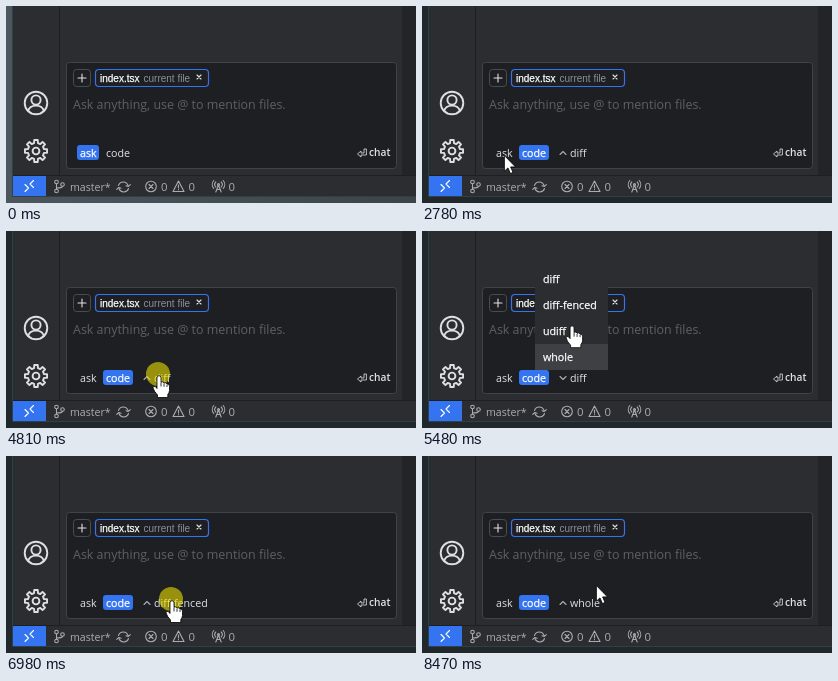
Animation of 410 by 197 pixels, one loop 8.54 s. Source, as an HTML page:

```html
<!DOCTYPE html>
<html lang="en">
<head>
<meta charset="utf-8">
<title>Chat mode switcher</title>
<style>
  html, body { margin: 0; width: 100%; height: 100%; overflow: hidden; background: #20282c; }
  svg { display: block; width: 100%; height: 100%; }
  text { font: 10.7px "Open Sans", "Noto Sans", sans-serif; fill: #dfe1e5; white-space: pre; }
  .chip { font: 10px "Liberation Sans", Arial, sans-serif; }
  .hint { font-size: 12.46px; fill: #5d6066; }
  .strong { stroke: #fff; stroke-width: .25; fill: #fff; }
  .status text { fill: #a8adb5; font-size: 11.4px; }
  .status .branch { font-size: 10.6px; }
  .line { fill: none; stroke: #a8adb5; stroke-width: 1.1; stroke-linecap: round; stroke-linejoin: round; }
  .bar { stroke: #dcdfe4; stroke-width: 1.9; }
  .light { stroke: #dfe1e5; }
</style>
</head>
<body>
<svg viewBox="0 0 410 197" preserveAspectRatio="none">
  <defs>
    <linearGradient id="sky" x1="0" y1="0" x2="1" y2="0">
      <stop offset="0" stop-color="#4b575d"/>
      <stop offset="1" stop-color="#3b4549"/>
    </linearGradient>
  </defs>
  <rect width="410" height="197" fill="#20282c"/>
  <rect id="desk" width="410" height="197" fill="url(#sky)"/>

  <path d="M7 0H410V190H7Z" fill="#2b2d30"/>
  <path d="M6.5 0V190.500H410" fill="none" stroke="#2f4049"/>
  <rect x="396" width="14" height="169" fill="#222427"/>
  <path d="M53.5 0V169.5M7 169.5H410" stroke="#1e1f22" fill="none"/>

  <!-- activity bar -->
  <g class="line bar">
    <circle cx="30" cy="97" r="11.3"/>
    <circle cx="30" cy="94" r="4.6"/>
    <path d="M22.2 105Q23.4 99.6 30 99.6T37.8 105"/>
    <path id="gear"/>
    <circle cx="30" cy="145" r="3.4"/>
  </g>

  <!-- prompt panel -->
  <rect x="60.5" y="56.5" width="330" height="106" rx="3" fill="#1e1f22" stroke="#414347"/>
  <rect x="67.5" y="63.5" width="17" height="17" rx="3" fill="#1e1f22" stroke="#4a4c51"/>
  <path class="line light" d="M72 72H80M76 68V76"/>
  <rect x="89.5" y="63.5" width="113" height="17" rx="3.5" fill="#1e1f22" stroke="#3574f0" stroke-width="1.2"/>
  <text class="chip strong" x="94" y="75.5">index.tsx</text>
  <text class="chip" x="137.5" y="75.5" style="fill:#8c9097">current file</text>
  <path class="line light" d="M191 69L195 73M195 69L191 73"/>
  <text class="hint" x="67" y="102.5">Ask anything, use @ to mention files.</text>
  <rect id="pill" y="139" height="15" rx="3" fill="#3574f0"/>
  <text id="ask" x="74" y="150.5">ask</text>
  <text id="code" x="100" y="150.5">code</text>
  <g id="format">
    <path id="chevron" class="line"/>
    <text id="label" x="148" y="150.5"></text>
  </g>
  <path class="line light" stroke-width=".7" style="stroke-width:.8" d="M360 143H358V147H355V145L351.5 148 355 151V149H360Z"/>
  <text x="363" y="150" style="font-weight:600;font-size:10.2px">chat</text>

  <!-- status bar -->
  <g class="status">
    <rect x="7" y="170" width="33" height="20" fill="#3574f0"/>
    <path class="line" d="M19 178.5L22.5 182 19 185.5M27.5 174.5L24 178 27.5 181.5" style="stroke:#fff"/>
    <g class="line">
      <circle cx="50.5" cy="176" r="1.8"/>
      <circle cx="50.5" cy="185" r="1.8"/>
      <circle cx="56.5" cy="178.5" r="1.8"/>
      <path d="M50.5 178V183M56.5 180.5Q56 182 50.5 182"/>
      <path d="M112.5 179.5A5 5 0 0 1 122 179.5M122.5 182.5A5 5 0 0 1 113 182.5"/>
      <path d="M120 179.7L122.2 180.5 124.3 178.7M115 182.3L112.8 181.5 110.7 183.3"/>
      <circle cx="145" cy="180.5" r="5.3"/>
      <path d="M143 178.5L147 182.5M147 178.5L143 182.5"/>
      <path d="M172.5 175L178 185.5H167ZM172.5 179V182M172.5 183.5V183.7"/>
      <path d="M212.5 179L209.8 186M212.5 179L215.2 186M210.8 183.5H214.2"/>
      <circle cx="212.5" cy="178.5" r="1"/>
      <path d="M209.8 181A3.6 3.6 0 0 1 209.8 176M215.2 181A3.6 3.6 0 0 0 215.2 176M207.8 182.5A6 6 0 0 1 207.8 174.5M217.2 182.5A6 6 0 0 0 217.2 174.5"/>
    </g>
    <text class="branch" x="64" y="184.5">master*</text>
    <text x="155" y="185">0</text>
    <text x="182.5" y="185">0</text>
    <text x="222.5" y="185">0</text>
  </g>

  <g id="menu">
    <rect y="35" width="73" height="104" rx="2" fill="#2b2d30"/>
    <rect y="113" width="73" height="26" fill="#3e4044"/>
  </g>

  <circle id="click" r="12" fill="#f0e400" opacity=".58"/>
  <g id="cursor" stroke="#000" fill="#fff" stroke-linejoin="round">
    <path id="arrow" stroke-width=".8" d="M.4 .6V16.2L4 12.9 6.4 18.5 9 17.4 6.6 11.9H11.5Z"/>
    <g id="hand" stroke-width=".8" transform="translate(1 1)">
      <path d="M-2 2Q0 -1 2 2V7.2Q4.300 6 5 8Q7.3 7 8 9Q10.5 8.6 10.5 11.2V15.5Q10.3 17.5 8.8 19.5V22.5H-1.5V20Q-5 16.5 -6 12.8Q-5.6 10.3 -3.6 11.6L-2 13.5Z"/>
      <path d="M2 7.5V11.5M5 8.5V11.8M8 9.5V12" fill="none"/>
    </g>
  </g>
</svg>
<script>
const LOOP = 8540;
const OPTIONS = ['diff', 'diff-fenced', 'udiff', 'whole'];
const $ = id => document.getElementById(id);
const show = (el, on) => el.setAttribute('visibility', on ? 'inherit' : 'hidden');
const set = (el, attrs) => { for (const k in attrs) el.setAttribute(k, attrs[k]); };
const within = (t, spans) => spans.some(([a, b]) => t >= a && t < b);

// Pointer moves: start, end, target x, target y
const MOVES = [
  [70, 550, 99, 153], [950, 1500, 115, 147], [2440, 2780, 82, 149],
  [3520, 3720, 114, 149], [4200, 4540, 152, 143], [5210, 5620, 148, 75],
  [6290, 6710, 165, 143], [7250, 7670, 163, 132], [7800, 7930, 161, 130],
  [8270, 8470, 174, 129]
];
const CLICKS = [[1880, 1950], [3050, 3180], [3920, 4060], [4810, 4940], [5950, 6080], [6980, 7050], [7800, 7930]];
const CODE = [[1950, 3180], [4060, LOOP]];
const OPEN = [[4940, 6080], [7050, 7930]];

OPTIONS.forEach((name, i) => {
  const el = document.createElementNS('http://www.w3.org/2000/svg', 'text');
  set(el, { class: 'strong', x: 8, y: 52 + 26 * i });
  el.textContent = name;
  $('menu').appendChild(el);
});

function gearPath(cx, cy, teeth) {
  const step = Math.PI * 2 / teeth, pts = [];
  for (let i = 0; i < teeth; i++)
    for (const [r, f] of [[8.2, -.3], [11.2, -.2], [11.2, .2], [8.2, .3]]) {
      const a = (i + f) * step;
      pts.push((cx + r * Math.cos(a)).toFixed(2) + ' ' + (cy + r * Math.sin(a)).toFixed(2));
    }
  return 'M' + pts.join('L') + 'Z';
}
$('gear').setAttribute('d', gearPath(30, 145, 8));

function pointer(t) {
  let x = 128, y = 202;
  for (const [a, b, tx, ty] of MOVES) {
    if (t < a) break;
    const p = Math.min(1, (t - a) / (b - a)), e = p * p * (3 - 2 * p);
    x += (tx - x) * e;
    y += (ty - y) * e;
  }
  return [x, y];
}

function draw(t) {
  const code = within(t, CODE), open = within(t, OPEN);
  const format = t < 6080 ? 'diff' : t < 7930 ? 'diff-fenced' : 'whole';
  const menuX = t < 6080 ? 113 : 131;
  const [x, y] = pointer(t);
  const inBox = (l, top, r, bottom) => x >= l && x <= r && y >= top && y <= bottom;

  show($('desk'), t < 70);
  set($('pill'), code ? { x: 97, width: 30 } : { x: 71, width: 22 });
  set($('ask'), { class: code ? '' : 'strong' });
  set($('code'), { class: code ? 'strong' : '' });
  show($('format'), code);
  $('label').textContent = format;
  $('chevron').setAttribute('d', open ? 'M138 145.5L141 148.5 144 145.5' : 'M138 148.5L141 145.5 144 148.5');

  show($('menu'), open);
  $('menu').setAttribute('transform', `translate(${menuX} 0)`);

  const overMenu = open && inBox(menuX, 35, menuX + 73, 139);
  const overFormat = code && inBox(135, 138, format === 'diff-fenced' ? 202 : 178, 156);
  const hand = overMenu || overFormat || inBox(89, 63, 203, 81);
  show($('cursor'), t >= 70);
  show($('hand'), hand);
  show($('arrow'), !hand);
  $('cursor').setAttribute('transform', `translate(${x.toFixed(2)} ${y.toFixed(2)})`);
  show($('click'), within(t, CLICKS));
  set($('click'), { cx: x, cy: y });
}

const start = performance.now();
function tick() {
  draw((performance.now() - start) % LOOP);
  requestAnimationFrame(tick);
}
draw(0);
requestAnimationFrame(tick);
</script>
</body>
</html>
```
